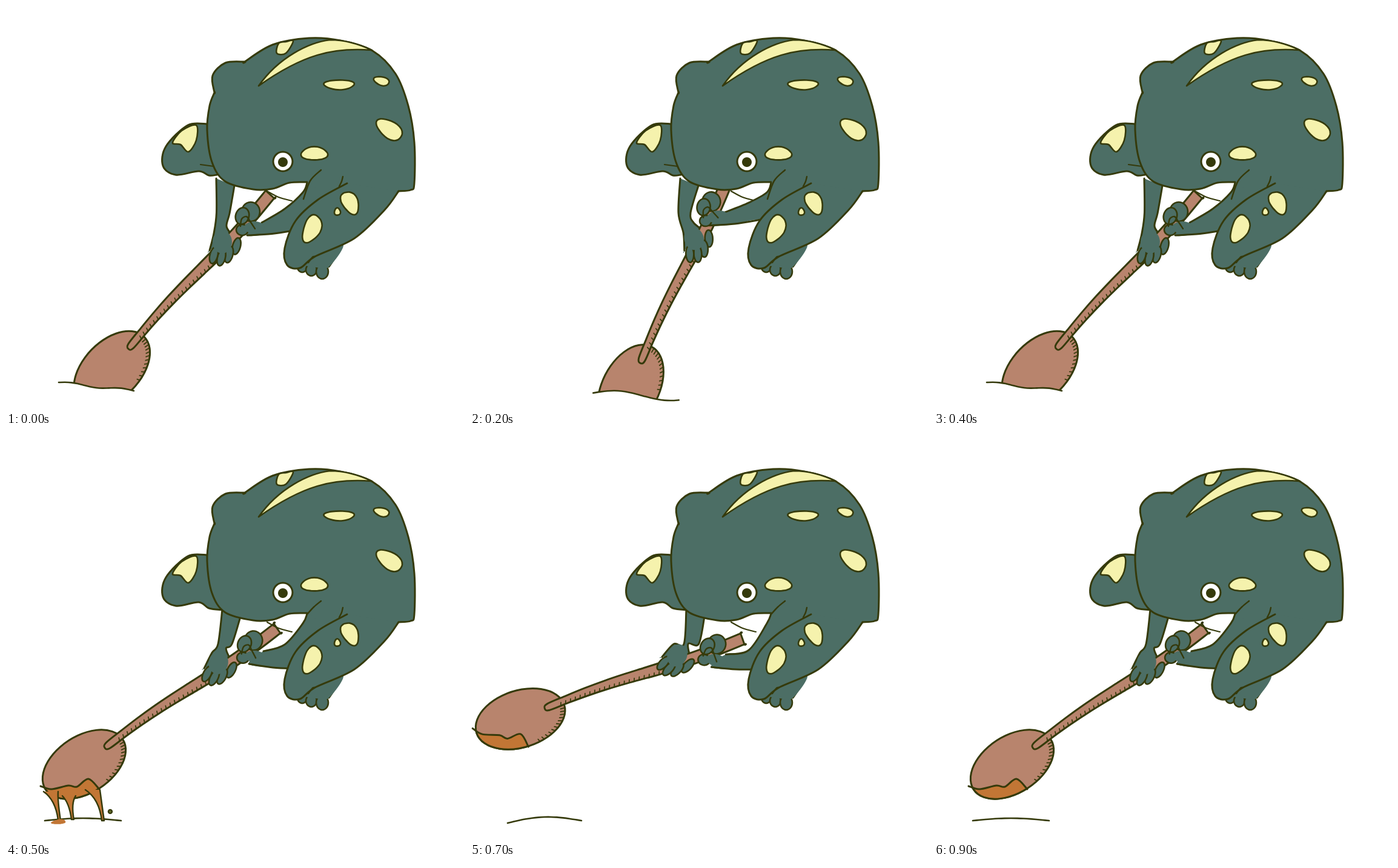
These frames come from a looping animation (756x666 px, 1000 ms). An HTML page with a canvas:

```html
<!DOCTYPE html>
<html lang="en">
<head>
<meta charset="utf-8">
<title>Digging frog</title>
<style>
html, body { margin: 0; width: 100%; height: 100%; overflow: hidden; background: #fff; }
canvas { display: block; }
</style>
</head>
<body>
<canvas id="stage" width="756" height="666"></canvas>
<script>
const ctx = document.getElementById('stage').getContext('2d');
const INK = '#353a0b', SKIN = '#4c6e65', SPOT = '#f5f2ad', WOOD = '#b8846d', MUD = '#c27635';
const DEG = Math.PI / 180, PEN = 3;

const pts = s => s.split(' ').map(p => p.split(',').map(Number));
const mix = (a, b, k) => Array.isArray(a) ? a.map((v, i) => mix(v, b[i], k)) : a + (b - a) * k;
const mixPose = (a, b, k) =>
  Object.fromEntries(Object.keys(a).map(key => [key, mix(a[key], b[key], k)]));
const range = (n, f) => Array.from({ length: n }, (_, i) => f(i));

// Smooth curve through points; a doubled point makes a corner
function curve(p, closed) {
  const n = p.length, path = new Path2D();
  const at = i => closed ? p[(i + n) % n] : p[Math.max(0, Math.min(n - 1, i))];
  path.moveTo(...p[0]);
  for (let i = 0; i < (closed ? n : n - 1); i++) {
    const [a, b, c, d] = [at(i - 1), at(i), at(i + 1), at(i + 2)];
    path.bezierCurveTo(
      b[0] + (c[0] - a[0]) / 6, b[1] + (c[1] - a[1]) / 6,
      c[0] - (d[0] - b[0]) / 6, c[1] - (d[1] - b[1]) / 6, c[0], c[1]);
  }
  if (closed) path.closePath();
  return path;
}

function paint(path, color, width = PEN) {
  ctx.fillStyle = color;
  ctx.fill(path);
  ctx.lineWidth = width;
  if (width) ctx.stroke(path);
}
function line(p, width = PEN) { ctx.lineWidth = width; ctx.stroke(curve(p)); }

// Filled shape whose outline is left open; the fill reaches to an inner anchor
function open(p, color, anchor = p[0]) {
  const path = curve(p);
  path.lineTo(...anchor);
  paint(path, color, 0);
  line(p);
}

// Slightly irregular oval
function pebble([x, y, rx, ry, rot = 0], color, width = PEN, wobble = 0) {
  const c = Math.cos(rot), s = Math.sin(rot);
  paint(curve(range(14, i => {
    const a = i * Math.PI / 7, r = 1 + wobble * Math.sin(3 * a + x);
    const u = rx * r * Math.cos(a), v = ry * r * Math.sin(a);
    return [x + u * c - v * s, y + u * s + v * c];
  }), true), color, width);
}

function limb(a, b) {
  paint(curve([...a, a[a.length - 1], b[b.length - 1], ...[...b].reverse(), b[0], a[0]]), SKIN, 0);
  line(a);
  line(b);
}

function turned([cx, cy], [dx, dy], angle, draw) {
  ctx.save();
  ctx.translate(cx + dx, cy + dy);
  ctx.rotate(angle * DEG);
  ctx.translate(-cx, -cy);
  draw();
  ctx.restore();
}

const body = pts('497,291 468,292 440,302 408,303 362,290 340,258 332,205 336,165 344,143 344,143 341,115 362,94 394,92 394,92 440,64 500,53 552,57 605,74 643,112 664,165 674,225 674,293 668,304 648,306');
const thigh = pts('563,293 515,320 478,355 460,400 464,428 485,433 510,414 575,384 625,337 648,306');
const farLeg = pts('332,195 300,197 264,232 259,264 280,279 318,273');
const farSpot = pts('275,226 290,206 314,197 314,222 301,241 288,229');
const neckSpot = pts('474,58 462,78 447,78 450,62 462,59');
const band = new Path2D('M417,132C450,85 500,60 535,56C560,56 585,64 604,73C540,68 490,80 417,132Z');
const backSpots = [[550, 130, 25, 8], [620, 124, 13, 7, 0.25], [633, 204, 24, 14, 0.6], [509, 244, 22, 11]];
const thighSpots = [[568, 325, 13, 20, -0.5], [547, 340, 5, 6], [505, 368, 14, 24, 0.4]];

// Shovel at rest; every pose turns it about the joint
const HUB = [168, 510], BLADE = [129, 541, 76, 47, -33 * DEG], ROD = 340;
const rim = pts('57,577 75,582 103,576 117,578 136,565 154,582');

// ground: left, width, height, slope, wave, half waves
const low = { turn: -12.8, hub: [206, 562], upper: [0, 0], lower: [0, 0], ground: [87, 124, 622, 14, -2, 3] };
const steep = { turn: -26.5, hub: [268, 580], upper: [-3, -13], lower: [13, -5], ground: [180, 138, 636, 9, -5, 2] };
const lift = { turn: 0, hub: HUB, upper: [3, -4], lower: [-9, -17], ground: [64, 126, 634, 0, -4, 1] };
const high = { turn: 11.8, hub: [138, 461], upper: [1, 0], lower: [-18, -27], ground: [62, 122, 638, -4, -8, 1] };
const deepest = mixPose(low, steep, 1.25);
const highest = { ...mixPose(lift, high, 1.3), ground: high.ground };
const cycle = [low, steep, deepest, steep, low, lift, high, highest, high, lift];

const groundLine = ([x, w, y, slope, wave, n]) => range(13, i => {
  const t = i / 12;
  return [x + w * t, y + slope * t + wave * Math.sin(n * Math.PI * t)];
});

// Keeps only what lies above or below a line
function clipAt(p, edge) {
  const path = curve(p);
  path.lineTo(999, p[p.length - 1][1]);
  path.lineTo(999, edge);
  path.lineTo(-999, edge);
  path.lineTo(-999, p[0][1]);
  ctx.clip(path);
}

function drawBlade(muddy) {
  pebble(BLADE, WOOD);
  const [x, y, rx, ry, rot] = BLADE;
  const at = (a, k) => {
    const u = rx * k * Math.cos(a), v = ry * k * Math.sin(a);
    return [x + u * Math.cos(rot) - v * Math.sin(rot), y + u * Math.sin(rot) + v * Math.cos(rot)];
  };
  for (let a = 0.1; a < 1.4; a += 0.11) line([at(a, 1), at(a, 0.9)], 1.8);
  if (!muddy) return;
  ctx.save();
  clipAt(rim, 999);
  pebble(BLADE, MUD);
  ctx.restore();
  line(rim);
}

function drawRod({ hub, turn }) {
  const angle = (34.7 - turn) * DEG, ux = Math.cos(angle), uy = -Math.sin(angle);
  const at = (t, off) => {
    const side = off - 3 * Math.sin(2 * Math.PI * t);
    return [hub[0] + ux * ROD * t - uy * side, hub[1] + uy * ROD * t + ux * side];
  };
  const half = t => 5.5 + 4 * Math.min(1, t * 1.6);
  const top = range(11, i => at(i / 10, -half(i / 10)));
  const base = range(11, i => at(1 - i / 10, half(1 - i / 10)));
  paint(curve([at(-0.018, 0), ...top, top[10], base[0], ...base], true), WOOD);
  for (let t = 0.06; t < 0.62; t += 0.025) line([at(t, half(t)), at(t + 0.006, half(t) - 5)], 1.7);
}

function drip(x, y, w, tipX, tipY) {
  const path = new Path2D();
  path.moveTo(x - w / 2, y);
  path.quadraticCurveTo(tipX - w / 4, mix(y, tipY, 0.3), tipX - 2, tipY);
  path.lineTo(tipX + 2, tipY);
  path.quadraticCurveTo(tipX - w / 8, mix(y, tipY, 0.3), x + w / 2, y);
  paint(path, MUD, 2.4);
}

function drawSpill(step) {
  if (step === 5) {
    drip(74, 586, 24, 88, 633);
    drip(104, 593, 22, 110, 632);
    drip(143, 583, 24, 160, 634);
    pebble([87, 636, 12, 4, -0.1], MUD, 0, 0.1);
    pebble([172, 619, 3, 3], '#66702c', 2.4);
  } else if (step === 6) {
    drip(28, 524, 14, 30, 548);
    drip(55, 530, 20, 57, 552);
    drip(101, 526, 16, 110, 554);
    [[14, 453, 5, 5], [6, 559, 5, 5], [116, 582, 3, 3]].forEach(d => pebble(d, MUD, 2.4));
  }
}

function drawFarArm({ turn, lower }) {
  const top = turn < 0 ? 347 : 357, grip = [358, 402];
  const a = (turn + 12.8) * DEG, c = Math.cos(a), s = Math.sin(a);
  const onHand = (x, y) => [
    grip[0] + lower[0] + x * c - y * s,
    grip[1] + lower[1] + x * s + y * c];
  return {
    arm: () => limb(
      [[top, 285], [350 + turn * 0.2, 342], onHand(-15, -26), onHand(-22, 2)],
      [[top + 30, 297], [373 + turn * 0.3, 342], onHand(6, -38), onHand(15, -24)]),
    hand: () => turned(grip, lower, turn + 12.8, () => {
      for (let i = 3; i >= 0; i--) {
        pebble([343 + 12.5 * i, 412 + 10 * Math.sin(i * 1.05) - 5 * i, 6.5, 14, 0.25], SKIN, 2.6);
      }
      pebble([357, 390, 16, 19], SKIN, 0);
    })
  };
}

function drawNearArm({ turn, upper }) {
  const [dx, dy] = upper;
  const elbow = [480, Math.min(384, 383 + turn)], wrist = [398 + dx, 379 + dy];
  const under = mix(elbow, wrist, 0.5);
  const top = [[497, 292], [490, 308], [460, 343 + turn * 0.6], [422 + dx, 358 + dy]];
  const base = [elbow, [under[0], under[1] + 2], wrist];
  paint(curve([top[0], ...top, ...[...base].reverse(), [500, 370], [565, 290], [565, 290]], true), SKIN, 0);
  line(top);
  line(base);
  turned([400, 352], upper, (turn + 12.8) / 2, () => {
    pebble([404, 340, 15, 16], SKIN, 2.6);
    pebble([390, 347, 11, 14, 0.3], SKIN, 2.6);
    pebble([390, 370, 10, 9], SKIN, 2.6);
    pebble([410, 366, 17, 10], SKIN, 0);
    line(pts('387,364 389,352 397,348 403,356 411,368'), 2.4);
  });
}

function drawBody(down) {
  open(body, SKIN, [570, 340]);
  line(pts(down ? '520,271 502,289 491,319' : '520,271 508,281 497,293'), 2.5);
  paint(band, SPOT, 2.6);
  paint(curve(neckSpot, true), SPOT, 2.6);
  backSpots.forEach(s => pebble(s, SPOT, 2.6, 0.06));
  open(thigh, SKIN);
  line(pts('556,282 554,290 550,298'), 2.4);
  line(pts('510,414 506,415 499,424'), 2.4);
  thighSpots.forEach(s => pebble(s, SPOT, 2.6, 0.08));
  pebble([457, 257, 16, 16], '#fff');
  pebble([457, 258, 6.5, 6.5], INK);
}

function drawLegs(down) {
  [[489, 431, 8, 9], [504, 436, 9, 10], [522, 439, 10, 12]].forEach(toe => pebble(toe, SKIN, 2.6));
  open(pts('556,394 546,412 533,431'), SKIN, [490, 425]);
  paint(curve(pts('556,394 533,431 512,432 488,426 500,410'), true), SKIN, 0);
  const leg = [...farLeg, ...pts(down ? '335,280 348,279' : '335,283 358,286')];
  open(leg, SKIN, [360, 230]);
  if (down) line(pts('321,262 343,265'), 2.2);
  paint(curve(farSpot, true), SPOT, 2.6);
}

function draw(step) {
  const pose = cycle[step], { turn, hub } = pose, down = turn < 0;
  const soil = groundLine(pose.ground), far = drawFarArm(pose);
  ctx.fillStyle = '#fff';
  ctx.fillRect(0, 0, 756, 666);
  ctx.strokeStyle = INK;
  ctx.lineCap = ctx.lineJoin = 'round';

  ctx.save();
  if (down) clipAt(soil, -999);
  turned(HUB, [hub[0] - HUB[0], hub[1] - HUB[1]], turn, () => drawBlade(!down));
  ctx.restore();
  line(soil, 2.6);
  drawSpill(step);

  drawLegs(down);
  far.arm();
  drawRod(pose);
  far.hand();
  line(pts('431,306 450,316 472,322'), 2.2);
  drawNearArm(pose);
  drawBody(down);
}

function tick() {
  draw(Math.floor(performance.now() % 1000 / 100));
  requestAnimationFrame(tick);
}
tick();
</script>
</body>
</html>
```
